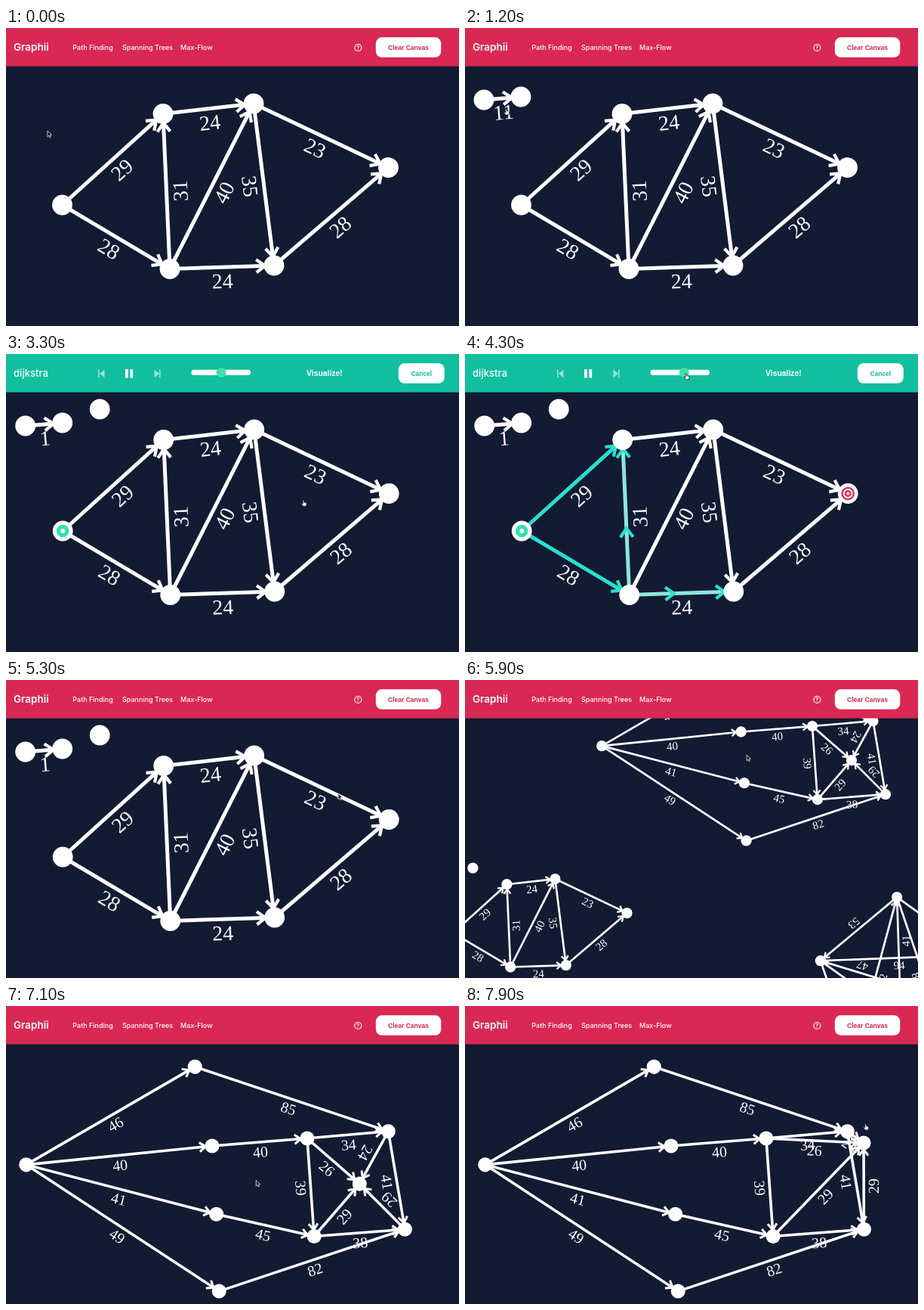
These frames come from a looping animation (600x394 px, 8000 ms). An HTML page:

```html
<!DOCTYPE html>
<html lang="en">
<head>
<meta charset="utf-8">
<title>Graph visualizer</title>
<style>
  html, body { margin: 0; width: 100%; height: 100%; overflow: hidden; background: #131b33; }
  svg { display: block; width: 100vw; height: 100vh; }
  .ui { font-family: Inter, "Open Sans", sans-serif; fill: #fff; }
  .bold { font-family: "Liberation Sans", Arial, sans-serif; font-weight: bold; }
  .weight { font: 28px "Liberation Serif", "Times New Roman", serif; fill: #fff; text-anchor: middle; }
  .edge { fill: none; stroke-width: 5; }
  .head { fill: none; stroke-width: 4.2; }
  #menu { filter: drop-shadow(0 4px 16px rgba(0, 0, 0, .2)); }
</style>
</head>
<body>
<svg viewBox="0 0 600 394">
  <rect width="600" height="394" fill="#131b33"/>
  <g id="world"></g>

  <g id="runBar">
    <rect width="600" height="50.6" fill="#11bf9f"/>
    <text class="ui" x="10" y="30.3" font-size="13.1" font-weight="500">dijkstra</text>
    <g fill="#fff">
      <path d="M122 20.5h1.6v11H122zM130.5 20.5v11L124 26z" opacity=".55"/>
      <path d="M158 20.3h3.8v11.2H158zM164.4 20.3h3.8v11.2h-3.8z"/>
      <path d="M196.5 20.5v11L203 26zM203 20.5h1.6v11H203z" opacity=".55"/>
      <rect x="245.5" y="20.7" width="78.5" height="7.4" rx="3.7"/>
      <text class="bold" x="398" y="29" font-size="10.4">Visualize!</text>
      <rect x="519.8" y="12.3" width="61" height="26.5" rx="8"/>
    </g>
    <circle id="knob" cy="24.4" r="6.5" fill="#3ee2a9"/>
    <text class="bold" x="550.3" y="28.6" text-anchor="middle" fill="#11b698" font-size="8.4">Cancel</text>
  </g>

  <g id="homeBar">
    <rect width="600" height="50.6" fill="#d92853"/>
    <text class="ui" x="10" y="30.3" font-size="13.5" font-weight="600">Graphii</text>
    <g class="ui" font-size="9" font-weight="500">
      <text x="88.3" y="28.6">Path Finding</text>
      <text x="154" y="28.6">Spanning Trees</text>
      <text x="231" y="28.6">Max-Flow</text>
    </g>
    <circle cx="466.3" cy="26" r="4.5" fill="none" stroke="#fff" stroke-width="1.2"/>
    <text class="ui" x="466.3" y="28.6" font-size="7" font-weight="700" text-anchor="middle">?</text>
    <rect x="489.8" y="12.3" width="86.5" height="26.5" rx="8" fill="#fff"/>
    <text class="bold" x="533" y="28.6" text-anchor="middle" fill="#cb2850" font-size="8.5">Clear Canvas</text>
    <g id="menu" class="bold" font-size="10.9" fill="#11bd9c">
      <rect x="83" y="46" width="124" height="115.6" rx="4" fill="#fff"/>
      <rect id="hover" x="96" y="103" width="71" height="20" fill="#eee"/>
    </g>
  </g>

  <g id="cursor" stroke-linejoin="round">
    <path id="arrow" d="M0 0V8.6L2 6.8L3.3 9.7L4.8 9L3.5 6.2L6.1 6Z" fill="#10131f" stroke="#fff" stroke-width=".8"/>
    <path id="hand" d="M-1.8 -4.2q.9 -.9 1.6 0L.6 -1.6L3 -.9Q4.3 -.4 4.1 1L3.4 4.4H-1L-3.7 .9Q-3.6 -.4 -2.2 .2L-1.2 1Z" fill="#fff" stroke="#10131f" stroke-width=".9"/>
  </g>
</svg>

<script>
const LOOP = 8000, STEP = 100, GLIDE = 300;
const WHITE = '#fff', TEAL = '#28dfcf', MINT = '#8ee6dc', PINK = '#dc2b55';
const CANCEL = 5000, GRAB = 7400;
const $ = id => document.getElementById(id);

function set(el, attrs) {
  for (const k in attrs) el.setAttribute(k, attrs[k]);
  return el;
}
function make(tag, attrs, parent) {
  const el = document.createElementNS('http://www.w3.org/2000/svg', tag);
  parent.append(el);
  return set(el, attrs);
}
const show = (el, on) => { el.style.display = on ? '' : 'none'; };
const ramp = (t, a, b) => Math.min(1, Math.max(0, (t - a) / (b - a)));
const ease = k => k * k * (3 - 2 * k);
const mix = (a, b, k) => a + (b - a) * k;

['DFS', 'BFS', 'DIJKSTRA', 'A*'].forEach((name, i) => {
  make('text', { x: 104.5, y: 76 + 20.4 * i }, $('menu')).textContent = name;
});

const nodes = {
  S: [74.5, 234], A: [208, 113.5], D: [328, 100], T: [506.5, 184.5], B: [217, 318.5], C: [355, 314],
  n1: [25, 95], n2: [74, 91], n3: [123.5, 73],
  a: [444, -230], b: [758, -412], c: [790, -265], d: [798, -138], e: [803, 5],
  f: [967, -279], g: [1118, -292], h: [1064.5, -194.5], i: [980, -97], j: [1149, -110],
  w: [1184.6, 363]
};
// Wheel graph: five rim nodes around w
[...'prvuq'].forEach((k, i) => {
  const a = (72 * i - 92) * Math.PI / 180;
  nodes[k] = [nodes.w[0] + 205 * Math.cos(a), nodes.w[1] + 218 * Math.sin(a)];
});
const home = nodes.h;
const born = { n1: 300, n2: 500, n3: 1500 };

const edges = `S A 29,S B 28,B A 31,B C 24,B D 40,A D 24,D C 35,D T 23,C T 28,n1 n2 11,
a b 46,a c 40,a d 41,a e 49,b g 85,c f 40,d i 45,e j 82,f g 34,f h 26,f i 39,g h 24,g j 41,i h 29,i j 38,j h 29,
p q 53,w p 41,u p 72,p v 86,p r 57,q r 94,w q 47,q u 63,q v 58`
  .split(',').map(s => s.trim().split(' '))
  .map(([from, to, weight]) => ({ from, to, weight }));
const newEdge = edges.find(e => e.from === 'n1');

// Edges explored together, one wave after another
const waves = ['SA SB', 'BA BC', 'BD AD CT'];

const world = $('world');
const HEAD = 'M-11.5 -8.5L0 0L-11.5 8.5';
for (const e of edges) {
  const wave = waves.findIndex(w => w.split(' ').includes(e.from + e.to));
  e.start = wave < 0 ? Infinity : 3750 + 400 * wave;
  e.g = make('g', {}, world);
  e.line = make('path', { class: 'edge' }, e.g);
  e.head = make('path', { class: 'head', d: HEAD }, e.g);
  e.runner = make('path', { class: 'head', d: HEAD, stroke: TEAL }, e.g);
  e.text = make('text', { class: 'weight', y: 27.9 }, e.g);
  e.text.textContent = e.weight;
}
const dots = {};
for (const k in nodes) dots[k] = make('circle', { r: 13.4, fill: WHITE }, world);

function ring(k, r, width, color) {
  const [cx, cy] = nodes[k];
  return make('circle', { cx, cy, r, fill: 'none', stroke: color, 'stroke-width': width }, world);
}
const startMark = [ring('S', 5.6, 5.4, '#2fe3ae')];
const endMark = [ring('T', 7.6, 2.3, PINK), ring('T', 3.2, 2.4, PINK)];

// Pointer stops: arrival time, node or point, shape
const stops = [
  [0, [55, 136]], [300, 'n1'], [500, 'n2'], [600, 'n1'], [900, 'n2'],
  [1100, [55, 111], 'hand'], [1500, 'n3'], [1800, [115, 26], 'hand'], [2300, [138, 112], 'hand'],
  [3000, 'S', 'hand'], [3400, 'T', 'hand'], [3600, [422, 26], 'hand'],
  [4100, [288, 30], 'hand'], [4500, [309, 30], 'hand'], [4900, [550, 27], 'hand'],
  [5300, [440, 150]], [5800, [179, 290]], [5900, [373, 99]], [6700, [283, 227]], [7300, [469, 240], 'hand']
].map(([at, spot, shape = 'arrow']) => ({ at, spot: nodes[spot] || spot, shape }));

// Rest at each stop, then glide to arrive at the next one on time
function pointer(t) {
  const n = stops.findLastIndex(s => s.at <= t);
  const from = stops[n], to = stops[n + 1] || from;
  const k = ease(ramp(t, Math.max(from.at, to.at - GLIDE), to.at)) || 0;
  return { x: mix(from.spot[0], to.spot[0], k), y: mix(from.spot[1], to.spot[1], k), shape: from.shape };
}

function camera(t) {
  const v = { s: 1, x: t < 1900 ? 0 : .7, y: 0 };
  const zoom = (cx, cy, f) => {
    v.s *= f;
    v.x = cx + (v.x - cx) * f;
    v.y = cy + (v.y - cy) * f;
  };
  const pan = (dx, dy, end) => {
    const k = ease(ramp(t, end - GLIDE, end));
    v.x += dx * k;
    v.y += dy * k;
  };
  zoom(440, 150, .533 ** ramp(t, 5300, 5500));
  pan(-261.3, 139.7, 5800);
  zoom(373, 100, 1.335 ** ramp(t, 5900, 6300));
  pan(-90.2, 127, 6700);
  return v;
}

function drawEdge(e, t) {
  const [x1, y1] = nodes[e.from], [x2, y2] = nodes[e.to];
  const len = Math.hypot(x2 - x1, y2 - y1);
  const angle = Math.atan2(y2 - y1, x2 - x1) * 180 / Math.PI;
  const p = t < CANCEL ? ramp(t, e.start, e.start + 350) || 0 : 0;
  set(e.g, { transform: `translate(${x1} ${y1}) rotate(${angle})` });
  set(e.line, { d: `M0 0H${len - 14}`, stroke: p === 0 ? WHITE : p < 1 ? MINT : TEAL });
  set(e.head, { transform: `translate(${len - 12})`, stroke: p === 0 ? WHITE : TEAL });
  set(e.runner, { transform: `translate(${len * p})` });
  show(e.runner, p > 0 && p < 1);
  set(e.text, { x: len / 2 });
}

function render(t) {
  const v = camera(t), cur = pointer(t);
  set(world, { transform: `translate(${v.x} ${v.y}) scale(${v.s})` });

  // The held node swings up and back in an arc, trailing the pointer
  nodes.h = home;
  if (t >= GRAB) {
    const k = ramp(t, GRAB, 7900), swing = Math.sin(Math.PI * k);
    const x = mix(468.5, 528, k) + 45 * swing, y = mix(235, 181, k) - 125 * swing;
    nodes.h = [(x - v.x) / v.s, (y - v.y) / v.s];
    cur.x = x + 3 * k;
    cur.y = mix(y + 5, y - 21, k);
  }
  for (const k in nodes) {
    set(dots[k], { cx: nodes[k][0], cy: nodes[k][1] });
    show(dots[k], t >= (born[k] || 0));
  }
  for (const e of edges) drawEdge(e, t);
  show(newEdge.g, t >= 900);
  newEdge.text.textContent = t < 1300 ? '11' : '1';
  for (const m of startMark) show(m, t >= 3000 && t < CANCEL);
  for (const m of endMark) show(m, t >= 3400 && t < CANCEL);

  const homeY = -163 * (ramp(t, 2420, 2700) - ramp(t, CANCEL, 5300));
  const runY = 60 * (ramp(t, 2500, 2700) - ramp(t, 4950, 5100) - 1);
  set($('homeBar'), { transform: `translate(0 ${homeY})` });
  set($('runBar'), { transform: `translate(0 ${runY})` });
  set($('knob'), { cx: mix(285, 305, ease(ramp(t, 4200, 4500))) });
  show($('menu'), t >= 1800 && t < 2700);
  show($('hover'), t >= 2200);

  set($('cursor'), { transform: `translate(${cur.x} ${cur.y}) scale(.9)` });
  show($('hand'), cur.shape === 'hand');
  show($('arrow'), cur.shape === 'arrow');
}

const began = performance.now();
let last = -1;
function tick(now) {
  const t = Math.floor(Math.max(0, now - began) % LOOP / STEP) * STEP;
  if (t !== last) render(last = t);
  requestAnimationFrame(tick);
}
render(0);
requestAnimationFrame(tick);
</script>
</body>
</html>
```
